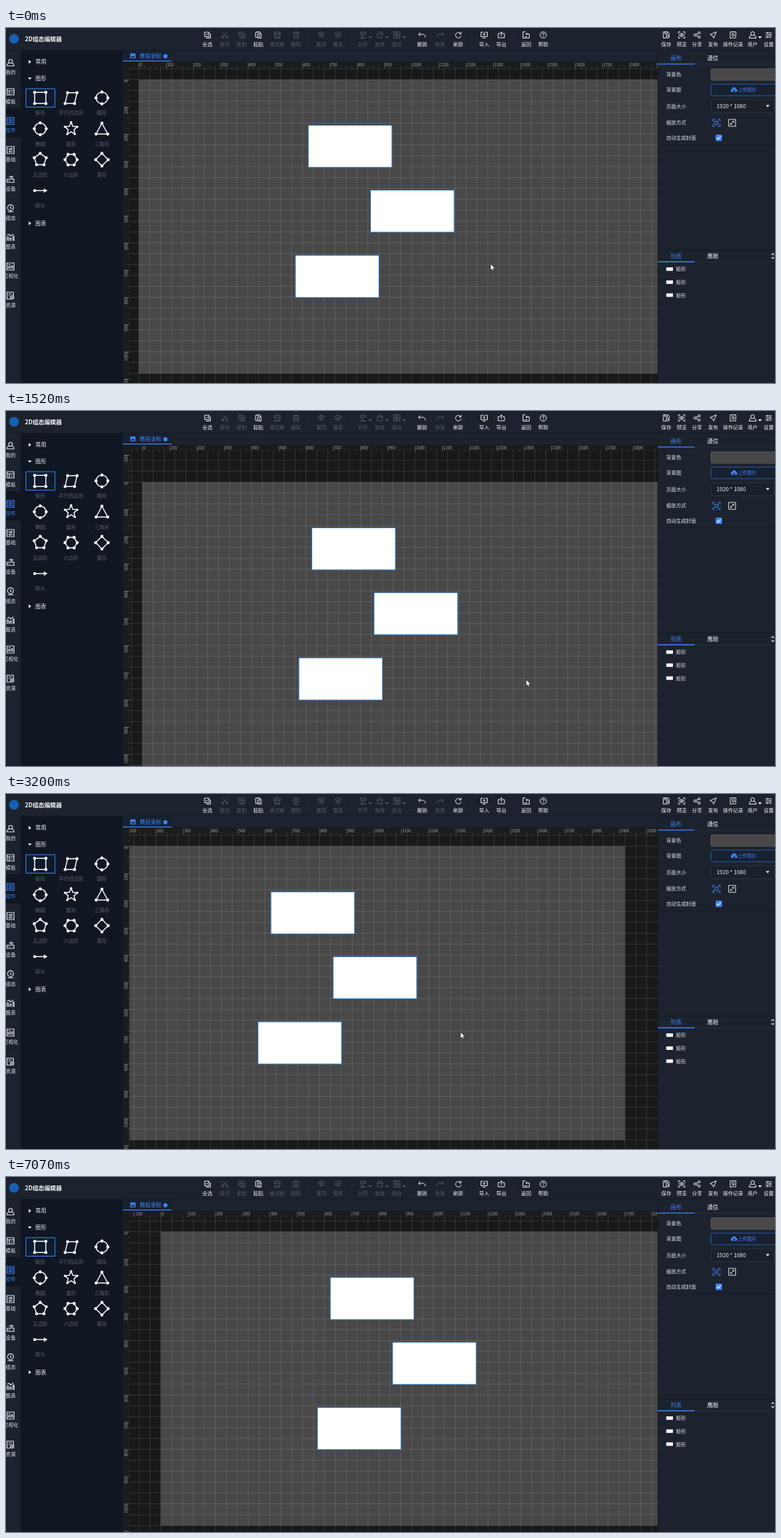
Write an HTML page with a canvas that moves like this. It is 1100 by 509 pixels and loops after 7170 ms.

```html
<!DOCTYPE html>
<html lang="zh-CN">
<head>
<meta charset="utf-8">
<style>
html, body { margin: 0; width: 100%; height: 100%; overflow: hidden; background: #1c232e; }
canvas { display: block; }
</style>
</head>
<body>
<canvas id="stage" width="1100" height="509"></canvas>
<script>
const ctx = document.getElementById('stage').getContext('2d');
const LOOP = 7170, SCALE = 0.39, PAGE_W = 1920 * SCALE, PAGE_H = 1080 * SCALE;
const BLUE = '#3f83f8', WHITE = '#f4f6f8', DIM = '#555b64', GREY = '#596473', BAR = '#1c232e', DARK = '#101722';
const FONT = '"Noto Sans CJK SC", "Noto Sans CJK", "Noto Sans", sans-serif';

// The picture is refreshed only at these moments.
const TICKS = [0, 120, 710, 850, 1000, 1400, 1520, 1640, 1760, 1880, 2030, 2150, 2270, 2390, 2540,
  2690, 2810, 2960, 3080, 3200, 3350, 3470, 3630, 3910, 4060, 4180, 4330, 4450, 4570, 4690, 4810,
  4930, 5080, 5230, 5350, 5470, 5770, 5890, 6010, 6130, 6250];

// Keys are [time, x, y]; the page trails slightly behind the hand that drags it.
const PAN = [[0, 190, 74], [120, 184, 73], [590, 184, 73], [1000, 47.5, 48.5], [1250, 47.5, 48.5],
  [1520, 195, 102], [1700, 268, 117], [1880, 286, 115], [2270, 200.5, 92], [2540, 130, 74],
  [2810, 94, 67], [2960, 92, 67], [3200, 136.5, 74.8], [3470, 213, 78.5], [3630, 221.5, 78.5]];
const POINTER = [[0, 693, 338], [120, 687, 337], [590, 687, 337], [1000, 551, 313], [1250, 551, 313],
  [1520, 744, 385], [1700, 785, 383], [1880, 782, 377], [2270, 690, 354], [2540, 622, 336],
  [2810, 594, 331], [2960, 600, 332], [3200, 650, 341], [3470, 720, 343], [3630, 726, 343],
  [3910, 726, 343], [4180, 745, 467], [4600, 800, 477], [4930, 866, 471], [5080, 929, 472],
  [5230, 985, 468], [5470, 946, 427], [5630, 946, 427], [6250, 1050, 512]];

function sample(keys, t) {
  const i = keys.findIndex(k => k[0] > t);
  if (i < 0) return keys[keys.length - 1].slice(1);
  const [t0, x0, y0] = keys[i - 1], [t1, x1, y1] = keys[i], p = (t - t0) / (t1 - t0);
  return [x0 + (x1 - x0) * p, y0 + (y1 - y0) * p];
}

const circle = (x, y, r) => `M${x - r} ${y}a${r} ${r} 0 1 0 ${2 * r} 0a${r} ${r} 0 1 0 ${-2 * r} 0`;
const LAYERS = 'M0-4.5L4.5-2 0 .5-4.5-2zM-4.5 1L0 3.5 4.5 1';
const PERSON = circle(0, -2, 2.7) + 'M-2 .5Q-5 1-5 4.5H5Q5 1 2 .5';
const SLIDERS = 'M-4.5-3H4.5M-4.5 0H4.5M-4.5 3H4.5M-1.5-4.3v2.6M2-1.3v2.6M-2 1.7v2.6';
const RECORD = 'M-4-4.5H4V0M-4-4.5v9h3M-2-2H2M-2 0h2' + circle(2, 2.3, 2.2);
const ICONS = {
  全选: 'M-4-4H2.5V2.5H-4zM-2 4.5H4.5V-2M-2.5-1l1.5 1.5 2.5-3',
  剪切: 'M-4-4.5L2.5 2M4-4.5L-2.5 2' + circle(-3, 3, 1.5) + circle(3, 3, 1.5),
  复制: 'M-4-4H2.5V2.5H-4zM-2 4.5H4.5V-2M-.8-2.5v3.5M-2.5-.8H1',
  粘贴: 'M-1.5 3.5H-4v-7.5h7v2M-2-4.5h3M-1-1.5h5v6h-5zM.5 1h2M.5 2.7h2',
  格式刷: 'M-4.5-1h9v-2.3h-3v-1.5h-3v1.5h-3zM-3.5-1v5.5h7V-1M-1 4.5V2M1.3 4.5V2',
  删除: 'M-4.5-3h9M-1.5-4.5h3M-3.3-3v7.5h6.6V-3M-1-1v3.5M1-1v3.5',
  置顶: LAYERS + 'M0-3v5', 置底: LAYERS + 'M0-1v5',
  对齐: 'M-4.5 4.5h9M-3-4H4v3h-7zM-1.5-1v4H2',
  旋转: 'M-4-1.5h7v5.5h-7zM-2.5-4Q3-5 4.5-1',
  组合: 'M-4.5-4.5h9v9h-9zM-2.5-2.5h3v3h-3zM-.5-.5h3v3h-3z',
  撤销: 'M-2.5-3.5l-2.5 2.5 2.5 2.5M-5-1H1Q4.5-1 5 3.5',
  恢复: 'M2.5-3.5L5-1 2.5 1.5M5-1H-1Q-4.5-1-5 3.5',
  刷新: 'M3.3-2A4 4 0 1 0 4 1M4-4.5v3H1',
  导入: 'M-1.5-4h-3v6.5h9V-4h-3M0-4V.5M-1.7-1L0 .7 1.7-1M-2 4.5h4',
  导出: 'M-1.5-2h-3v6h9v-6h-3M0 1.5V-4.5M-1.7-2.8L0-4.5l1.7 1.7',
  返回: 'M-1-4.5h-3.5v9h9V-1.5H0M1.5-3.3L-.3-1.5 1.5.3M-2.5 2.5h4',
  帮助: circle(0, 0, 4.5) + 'M-1.5-1Q-1.3-2.6 0-2.6q1.7 0 1.5 1.5Q1.4-.4 0 .3v.9M0 2.2v.8',
  保存: 'M4.3-.5v-2l-2-2h-6.6v9h4M-2-4.5v2.7h3.5v-2.7' + circle(2, 2, 2.4) + 'M1 2l1 1 1.4-2',
  预览: 'M-4.5-2v-2.5h2.5M2-4.5h2.5V-2M4.5 2v2.5H2M-2 4.5h-2.5V2M-4 0Q0-4.5 4 0Q0 4.5-4 0' + circle(0, 0, 1.2),
  分享: circle(-3, 0, 1.6) + circle(3, -3, 1.6) + circle(3, 3, 1.6) + 'M-1.6-.8l3.2-1.5M-1.6.8l3.2 1.5',
  发布: 'M4.5-4.5L-4.5-.5-1 1 .8 4.5z',
  操作记录: RECORD, 用户: PERSON, 设置: SLIDERS,
  我的: PERSON,
  模板: 'M-5-4.5H5v9H-5zM-5-1.5H5M-2-1.5v6M0 1.5h3',
  控件: 'M-5-5H5V5H-5zM-3.5-2.5h7M-3.5 0h7M-3.5 2.5h7M-1-3.5v2M1.5-1v2M-1 1.5v2',
  基础: 'M-5-5H5V5H-5zM-3-2h6M-3 0h6M-3 2.5h6M1-3v2M-1 1.5v2',
  设备: 'M-5 0H5v4.5H-5zM-3 2.3h2M2 0v-2M-2-2.5Q1-6 4-2.5M0-2Q1-3.2 2-2',
  组态: circle(0, -.8, 4.3) + 'M0-3v3h2M-4 5h8M0 3.5V5',
  图表: 'M-5 5V-.5h2V5M-1 5V1h2v4M3.5 5v-7h1.5v7M-5-3l3-1.5L0-2l4-3',
  可视化: 'M-5-5H5V5H-5zM-3 3V0h2v3M1 3V-1h2v4M-3-2.5h3',
  资源: 'M0 5h-5V-5H4V0M-3-2.5h4.5M-3 0h2' + circle(2.3, 2.5, 2.5) + 'M2.3 1.2v2.6M1 2.5h2.6'
};

function box(x, y, w, h, fill, stroke, radius = 0) {
  ctx.beginPath();
  ctx.roundRect(x, y, w, h, radius);
  if (fill) { ctx.fillStyle = fill; ctx.fill(); }
  if (stroke) { ctx.strokeStyle = stroke; ctx.lineWidth = 1; ctx.stroke(); }
}
function text(str, x, y, size, color, align = 'left', weight = 400) {
  ctx.font = `${weight} ${size}px ${FONT}`;
  ctx.fillStyle = color;
  ctx.textAlign = align;
  ctx.textBaseline = 'middle';
  ctx.fillText(str, x, y);
}
function path(d, x, y, stroke, width = 0.95, fill) {
  const shape = new Path2D(d);
  ctx.save();
  ctx.translate(x, y);
  if (fill) { ctx.fillStyle = fill; ctx.fill(shape); }
  if (stroke) { ctx.strokeStyle = stroke; ctx.lineWidth = width; ctx.stroke(shape); }
  ctx.restore();
}
const caret = (x, y, color, d = 'M-2.7-1.4H2.7L0 1.6z') => path(d, x, y, null, 0, color);

function drawGrid(ox, oy, color) {
  const step = 40 * SCALE;
  ctx.beginPath();
  for (let x = 176 + ((ox - 176) % step + step) % step; x < 932; x += step) { ctx.moveTo(x, 57); ctx.lineTo(x, 509); }
  for (let y = 57 + ((oy - 57) % step + step) % step; y < 509; y += step) { ctx.moveTo(176, y); ctx.lineTo(932, y); }
  ctx.strokeStyle = color;
  ctx.lineWidth = 0.9;
  ctx.stroke();
}

function drawRuler(origin, start, length) {
  for (let unit = -400; unit <= 2400; unit += 20) {
    const pos = origin + unit * SCALE - start, major = unit % 100 === 0;
    if (pos < -14 || pos > length) continue;
    ctx.fillStyle = major ? '#777' : '#444';
    ctx.fillRect(pos, major ? 2 : 7, 0.8, major ? 7.5 : 2.5);
  }
}

function drawRulers(ox, oy) {
  box(167, 48, 765, 9.5, '#1b1c1e');
  box(167, 48, 9.5, 461, '#1b1c1e');
  ctx.save();
  ctx.beginPath(); ctx.rect(176, 48, 756, 10); ctx.clip();
  ctx.translate(176, 48);
  drawRuler(ox, 176, 756);
  for (let u = -400; u <= 2400; u += 100) text(u, ox + u * SCALE - 174.5, 4.8, 5.6, '#a4a4a4');
  ctx.restore();
  ctx.save();
  ctx.beginPath(); ctx.rect(167, 57, 10, 452); ctx.clip();
  ctx.translate(167, 57);
  ctx.save();
  ctx.transform(0, 1, 1, 0, 0, 0);
  drawRuler(oy, 57, 452);
  ctx.restore();
  ctx.rotate(-Math.PI / 2);
  for (let u = -400; u <= 1400; u += 100) text(u, 56 - oy - u * SCALE, 4.8, 5.6, '#a4a4a4', 'right');
  ctx.restore();
}

function drawWorkspace(ox, oy) {
  ctx.save();
  ctx.beginPath(); ctx.rect(167, 48, 765, 461); ctx.clip();
  box(167, 48, 765, 461, '#181919');
  box(ox, oy, PAGE_W, PAGE_H, '#484848');
  drawGrid(ox, oy, 'rgba(255,255,255,.13)');
  for (const [x, y] of [[242.5, 65.5], [331.5, 158.5], [224, 252]]) {
    box(ox + x, oy + y, 119.5, 60.3, '#fff', '#3c80c4');
  }
  drawRulers(ox, oy);
  ctx.restore();
}

const TOOLS = [['全选', 288], ['剪切', 313, 1], ['复制', 337, 1], ['粘贴', 361], ['格式刷', 388, 1], ['删除', 415, 1],
  ['置顶', 451, 1], ['置底', 475, 1], ['对齐', 510.5, 1], ['旋转', 535, 1], ['组合', 559, 1], ['撤销', 595], ['恢复', 621, 1],
  ['刷新', 647], ['导入', 684], ['导出', 708.5], ['返回', 744], ['帮助', 768.5], ['保存', 944.5], ['预览', 966.5],
  ['分享', 988.5], ['发布', 1011.5], ['操作记录', 1040], ['用户', 1068], ['设置', 1091]];

function drawToolbar() {
  box(0, 0, 1100, 32, BAR);
  box(0, 31, 1100, 1, '#171d26');
  path(circle(0, 0, 7), 11.5, 15.5, null, 0, '#1760b0');
  text('2D组态编辑器', 27, 15.5, 8.4, WHITE, 'left', 700);
  for (const [name, x, disabled] of TOOLS) {
    const color = disabled ? DIM : WHITE;
    path(ICONS[name], x, 10, color);
    text(name, x, 23.5, 7.2, color, 'center');
  }
  for (const x of [433, 493, 577, 665, 726]) box(x, 7, 0.7, 18, '#252c37');
  for (const x of [521, 545, 569.5]) caret(x, 13.5, DIM);
  caret(1078.5, 13.5, WHITE);
}

function drawNavigation() {
  box(0, 32, 21, 477, BAR);
  box(0, 115, 21, 42, DARK);
  ['我的', '模板', '控件', '基础', '设备', '组态', '图表', '可视化', '资源'].forEach((name, i) => {
    const y = 49.7 + i * 41.75, color = i === 2 ? BLUE : '#e2e6ea';
    path(ICONS[name], 6.5, y, color, 1.1);
    text(name, 6.7, y + 13.4, 7.1, color, 'center');
  });
}

const polygon = (n, r, turn = -Math.PI / 2) => Array.from({ length: n }, (_, i) => {
  const a = turn + i * 2 * Math.PI / n;
  return [r * Math.cos(a), r * Math.sin(a)];
});
const SHAPES = [
  ['矩形', [[-8, -8], [8, -8], [8, 8], [-8, 8]]],
  ['平行四边形', [[-5, -7.5], [8.5, -7.5], [5, 8], [-8.5, 8]]],
  ['圆形', polygon(4, 8.5), 'round'],
  ['椭圆', polygon(4, 8.5), 'round'],
  ['星形', polygon(5, 9.3), 'star'],
  ['三角形', [[0, -8], [8.3, 7.5], [-8.3, 7.5]]],
  ['五边形', polygon(5, 9)],
  ['六边形', polygon(6, 8.7, 0)],
  ['菱形', polygon(4, 9)],
  ['箭头', [[-8, 0]], 'arrow']];

function drawShapes() {
  box(21, 32, 146, 477, DARK);
  const arrow = 'M-1.5-2.8L2-.0-1.5 2.8z';
  [['常用', 48.5, arrow], ['图形', 72.5], ['图表', 280, arrow]].forEach(([name, y, d]) => {
    caret(34, y, WHITE, d);
    text(name, 42, y, 7.8, WHITE, 'left', 500);
  });
  box(28.5, 87, 41.5, 26.5, '#0f1a2c', BLUE);
  SHAPES.forEach(([name, points, kind], i) => {
    const x = 49 + i % 3 * 44.1, y = 100.2 + Math.floor(i / 3) * 44.3;
    let outline = points;
    if (kind === 'star') {
      const inner = polygon(5, 4.4, -Math.PI / 2 + Math.PI / 5);
      outline = points.flatMap((p, k) => [p, inner[k]]);
    }
    const d = kind === 'round' ? circle(0, 0, 8.3) : kind === 'arrow' ? 'M-8 0H8' : 'M' + outline.join('L') + 'z';
    path(d, x, y, WHITE, 1.5);
    for (const [px, py] of points) path(circle(px, py, kind === 'star' ? 1.6 : 2.2), x, y, null, 0, WHITE);
    if (kind === 'arrow') path('M5-3.2L10.5 0 5 3.2z', x, y, null, 0, WHITE);
    text(name, x, y + 21.4, 7.2, GREY, 'center');
  });
}

function drawTab() {
  box(167, 32, 766, 16, BAR);
  box(167, 32, 70, 16, '#172130');
  path('M-3.8-3.5H3.8V3.5H-3.8zM-2.8 2.3H2.8L1-.8-.3 1-1.4-.3z', 181.5, 40, null, 0, BLUE);
  text('教程录制', 191.5, 40.5, 7.6, BLUE);
  path(circle(0, 0, 3), 228, 40.5, null, 0, BLUE);
  box(167, 46.7, 70, 1.3, BLUE);
}

function drawPanelTabs(first, second, y, lineY) {
  text(first, 958.5, y, 8, BLUE, 'center');
  text(second, 1011, y, 8, WHITE, 'center');
  box(932.5, lineY, 167.5, 0.7, '#2a323e');
  box(932.5, lineY - 0.4, 52.5, 1.3, BLUE);
}

function drawProperties() {
  box(932.5, 32, 167.5, 477, BAR);
  box(932, 32, 0.8, 477, '#141a22');
  drawPanelTabs('画布', '通信', 42.7, 51.3);
  [['背景色', 66.5], ['背景图', 88], ['页面大小', 112], ['缩放方式', 135.7], ['自动生成封面', 157]]
    .forEach(([label, y]) => text(label, 944.5, y, 7.1, '#e4e8ec'));
  box(1008.5, 58.5, 96, 16.5, '#484848', '#555', 2);
  box(1008.5, 80.5, 96, 16.5, '#172130', '#28589f', 2);
  path('M-3 3Q-5.5 2.5-4.5 0Q-4-1.3-2.8-1.3Q-2-4 .5-3.6Q2.7-3.3 3-1Q5.3-.5 4.7 1.7Q4.2 3 3 3z', 1041.5, 88.5, null, 0, BLUE);
  path('M0 3V0M-1.5 1.2L0-.3 1.5 1.2', 1041.5, 88.8, '#172130');
  text('上传图片', 1047, 88.7, 6.6, BLUE);
  box(1008.5, 103, 90.5, 18.5, '#1a212b', '#29313c', 2);
  text('1920 * 1080', 1016.5, 112.5, 7.8, WHITE);
  caret(1089.5, 112, WHITE);
  path('M-5-2v-3h3M2-5h3v3M5 2v3H2M-2 5h-3V2M-2.2-2.2h4.4v4.4h-4.4z', 1016.3, 136, BLUE, 1.1);
  path('M-5-5H5V5H-5zM3.2-3.2L.8-.8M.8-3v2.2H3M-3.2 3.2L-.8.8M-.8 3V.8H-3', 1038.7, 136, '#d9dde1', 1);
  box(1015, 152.8, 9.2, 9.2, BLUE, null, 1.5);
  path('M-2.6 0L-.7 2 2.8-2', 1019.5, 157.4, '#fff', 1.2);
  box(932.5, 167, 167.5, 0.8, '#141a22');
  box(932.5, 318, 167.5, 1, '#141a22');
  drawPanelTabs('列表', '鹰眼', 327.2, 335);
  path('M-2-1.5L0-3.7 2-1.5M-2 1.5L0 3.7 2 1.5', 1096.8, 327, WHITE, 1.1);
  for (const y of [345.7, 364.4, 383]) {
    box(944.5, y - 2.5, 9.5, 5, '#fff');
    text('矩形', 958.3, y, 7.2, '#e4e8ec');
  }
}

function drawFrame(now) {
  const t = now % LOOP, tick = TICKS.filter(k => k <= t).pop();
  drawWorkspace(...sample(PAN, tick));
  drawToolbar();
  drawNavigation();
  drawShapes();
  drawTab();
  drawProperties();
  if (t >= 3910 && t < 7070) {
    ctx.globalAlpha = t < 6670 ? 1 : 0.5;
    box(728.3, 353, 16.8, 16.5, '#f9473d', null, 4);
    ctx.globalAlpha = 1;
  }
  path('M0 0V9.6L2.2 7.6 3.7 10.8 5.2 10.1 3.8 7H6.7z', ...sample(POINTER, tick), '#222', 0.8, '#fff');
  requestAnimationFrame(() => drawFrame(performance.now() - start));
}
const start = performance.now();
drawFrame(0);
</script>
</body>
</html>
```
